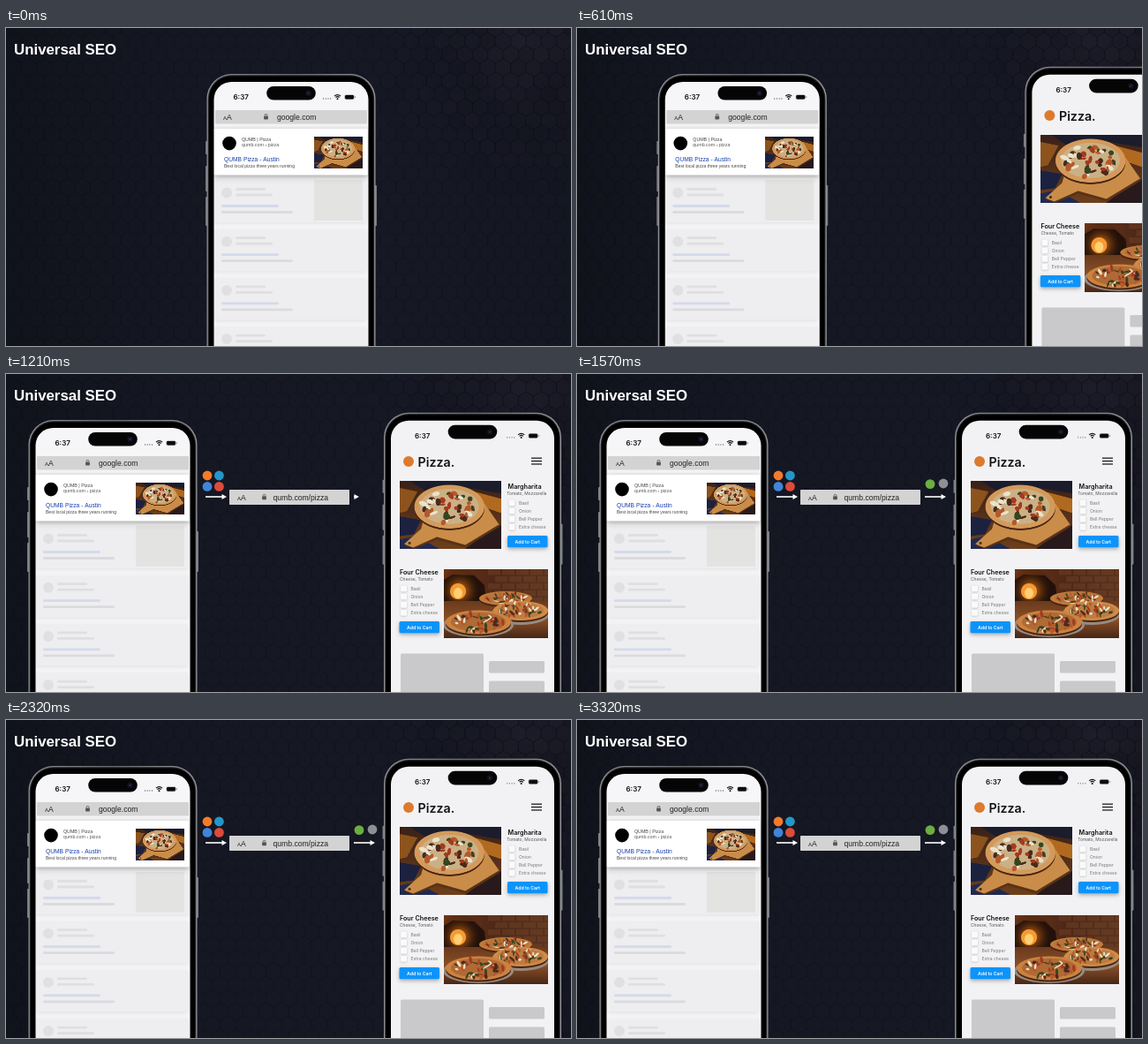
Write an HTML page with a canvas that moves like this. It is 640x360 px and loops after 3.49 s.

```html
<!DOCTYPE html>
<html lang="en">
<head>
<meta charset="utf-8">
<title>Universal SEO</title>
<style>
  html, body { margin: 0; width: 100%; height: 100%; overflow: hidden; background: #141621; }
  canvas { display: block; width: 640px; height: 360px; }
</style>
</head>
<body>
<canvas id="stage"></canvas>
<script>
const W = 640, H = 360, LOOP = 3490;
const SANS = '"Liberation Sans", Arial, sans-serif';
const UI = 'Inter, Roboto, sans-serif';
const dpr = window.devicePixelRatio || 1;
const canvas = document.getElementById('stage');
canvas.width = W * dpr;
canvas.height = H * dpr;
let ctx = canvas.getContext('2d');

const clamp = v => Math.min(1, Math.max(0, v));
const span = (t, a, b) => clamp((t - a) / (b - a));
const easeCubic = u => u < 0.5 ? 4 * u ** 3 : 1 - 4 * (1 - u) ** 3;
const easeQuad = u => u < 0.5 ? 2 * u * u : 1 - 2 * (1 - u) ** 2;

function seeded(seed) {
  return () => (seed = (seed * 16807) % 2147483647) / 2147483647;
}

function rect(x, y, w, h, color, r = 0) {
  ctx.fillStyle = color;
  ctx.beginPath();
  ctx.roundRect(x, y, w, h, r);
  ctx.fill();
}

function ellipse(x, y, rx, ry, color, turn = 0) {
  ctx.fillStyle = color;
  ctx.beginPath();
  ctx.ellipse(x, y, rx, ry, turn, 0, 7);
  ctx.fill();
}

const circle = (x, y, r, color) => ellipse(x, y, r, r, color);

function poly(color, ...pts) {
  ctx.fillStyle = color;
  ctx.beginPath();
  for (let i = 0; i < pts.length; i += 2) ctx.lineTo(pts[i], pts[i + 1]);
  ctx.fill();
}

function text(str, x, y, size, color, weight = 400, family = SANS, align = 'left') {
  ctx.font = `${weight} ${size}px ${family}`;
  ctx.textAlign = align;
  ctx.fillStyle = color;
  ctx.fillText(str, x, y);
}

function shadowed(color, blur, dy, draw) {
  ctx.save();
  ctx.shadowColor = color;
  ctx.shadowBlur = blur * dpr;
  ctx.shadowOffsetY = dy * dpr;
  draw();
  ctx.restore();
}

function fadeFrom(x0, y0, x1, y1, ...colors) {
  const g = ctx.createLinearGradient(x0, y0, x1, y1);
  colors.forEach((c, i) => g.addColorStop(i / (colors.length - 1), c));
  return g;
}

function glow(x, y, r, color) {
  const g = ctx.createRadialGradient(x, y, 0, x, y, r);
  g.addColorStop(0, color);
  g.addColorStop(1, 'transparent');
  ctx.fillStyle = g;
  ctx.fillRect(x - r, y - r, 2 * r, 2 * r);
}

// Draws once into an offscreen canvas and returns it.
function prerender(w, h, scale, draw) {
  const layer = document.createElement('canvas');
  layer.width = Math.round(w * scale);
  layer.height = Math.round(h * scale);
  const main = ctx;
  ctx = layer.getContext('2d');
  ctx.scale(scale, scale);
  draw();
  ctx = main;
  return layer;
}

function drawBackdrop() {
  ctx.fillStyle = fadeFrom(0, 0, W, 0, '#11131c', '#151723', '#161824', '#141621');
  ctx.fillRect(0, 0, W, H);
  glow(590, 20, 140, 'rgba(46,40,54,.25)');
  const R = 10, dx = R * Math.sqrt(3);
  const rand = seeded(41);
  for (let row = 0; row * R * 1.5 < H + R; row++) {
    for (let col = 0; col * dx < W + dx; col++) {
      const x = col * dx + (row % 2) * dx / 2, y = row * R * 1.5;
      const corner = clamp(1 - Math.hypot(x - 600, y) / 200);
      ctx.beginPath();
      for (let k = 0; k < 6; k++) {
        const a = Math.PI / 6 + k * Math.PI / 3;
        ctx.lineTo(x + R * Math.cos(a), y + R * Math.sin(a));
      }
      ctx.closePath();
      ctx.fillStyle = `rgba(80,66,85,${corner * rand() * 0.1})`;
      ctx.fill();
      ctx.lineWidth = 0.8;
      ctx.strokeStyle = `rgba(4,6,14,${0.08 + corner * 0.12})`;
      ctx.stroke();
    }
  }
}

function pizza(x, y, rx, ry, seed, crust, cheese) {
  ellipse(x, y + 2, rx, ry, '#4a2512');
  ellipse(x, y, rx, ry, crust);
  ellipse(x, y - 0.3, rx * 0.84, ry * 0.81, cheese);
  const rand = seeded(seed);
  const tones = ['#a33a20', '#37451f', '#ece2cb', '#b5582c', '#4a2a1c'];
  for (let i = 0; i < 45; i++) {
    const a = rand() * 6.28, d = Math.sqrt(rand()) * 0.76;
    ellipse(x + rx * d * Math.cos(a), y + ry * d * Math.sin(a),
      rx * (0.05 + rand() * 0.08), ry * (0.05 + rand() * 0.09), tones[i % 5], rand() * 3);
  }
}

function drawBoardPhoto() {
  rect(0, 0, 114, 76, fadeFrom(0, 0, 0, 76, '#3a2118', '#55301a', '#6e401b'));
  poly('#1b1c2c', 12, 0, 114, 0, 114, 14, 78, 8, 30, 12);
  poly('#8d531d', 0, 8, 20, 12, 8, 34, 0, 36);
  poly('#1c2140', 0, 40, 24, 44, 16, 60, 0, 62);
  poly('#202a52', 0, 66, 18, 62, 44, 76, 0, 76);
  poly('#b0691f', 84, 12, 114, 20, 114, 36, 96, 30);
  poly('#281a1c', 88, 66, 114, 50, 114, 76, 74, 76);
  poly('#5a3216', 6, 73, 24, 56, 30, 34, 96, 28, 112, 52, 74, 75, 42, 66, 17, 76);
  poly('#c98d49', 5, 71, 24, 54, 30, 32, 96, 26, 112, 49, 74, 72, 42, 63, 15, 75);
  circle(11, 70, 1.5, '#4a2c18');
  pizza(56, 29, 39.5, 24.5, 77, '#d39a5b', '#cbb085');
}

function drawOvenPhoto() {
  rect(0, 0, 118, 78, fadeFrom(0, 0, 118, 0, '#6e3518', '#4d2818', '#57331f'));
  for (let y = 0; y < 34; y += 8)
    for (let x = 50 + (y % 16); x < 118; x += 16) rect(x, y, 14, 6.5, 'rgba(125,72,40,.38)');
  poly('#24110c', 0, 36, 0, 12, 10, 6, 34, 7, 46, 18, 48, 36);
  glow(18, 24, 26, 'rgba(255,130,24,1)');
  ellipse(16, 25, 9, 9, '#f59a35');
  ellipse(16, 27, 5, 6, '#ffd071');
  rect(0, 36, 118, 42, fadeFrom(0, 36, 0, 78, '#6a3a1e', '#8a4f27', '#472717'));
  pizza(70, 33, 30, 8, 19, '#c27a3b', '#b8743a');
  ellipse(87, 50, 33, 13, '#968b80');
  pizza(87, 47, 31, 11, 23, '#d08b48', '#bd7c40');
  ellipse(39, 63, 40, 14, '#968b80');
  pizza(39, 60, 37, 13.5, 91, '#cc8240', '#b06a35');
}

const backdrop = prerender(W, H, dpr, drawBackdrop);
const boardPhoto = prerender(114, 76, 2 * dpr, drawBoardPhoto);
const ovenPhoto = prerender(118, 78, 2 * dpr, drawOvenPhoto);

function lock(x, y) {
  rect(x - 2.4, y - 0.8, 4.8, 4, '#555', 0.7);
  ctx.strokeStyle = '#555';
  ctx.lineWidth = 0.9;
  ctx.beginPath();
  ctx.arc(x, y - 1.2, 1.5, Math.PI, 0);
  ctx.stroke();
}

function addressBar(x, y, w, h, host) {
  rect(x, y, w, h, '#d3d3d4', 0.8);
  const base = y + h / 2 + 3, wide = w > 150;
  text('A', x + 9, base, 6, '#222');
  text('A', x + 13, base, 8.6, '#222');
  lock(x + (wide ? 57.5 : 39.5), y + h / 2 - 0.5);
  text(host, x + (wide ? 70 : 49.5), base, 8.6, '#222');
}

// Shell and status bar; x, y is the outer top left corner.
function phone(x, y, w, fill, statusGap) {
  for (const [top, len] of [[76, 15], [104, 29], [139, 33]])
    rect(x - 1.5, y + top, 2.4, len, '#77797e', 0.8);
  rect(x + w - 0.9, y + 126, 2.4, 46, '#77797e', 0.8);
  rect(x, y, w, 400, fadeFrom(x, 0, x + w, 0, '#8f9195', '#68696d', '#96989c'), 28);
  rect(x + 1.3, y + 1.3, w - 2.6, 400, '#232427', 27);
  rect(x + 2.4, y + 2.4, w - 4.8, 400, '#000', 26);
  rect(x + 8, y + 9, w - 16, 400, fill, 20);

  const mid = x + w / 2, line = y + 26;
  text('6:37', mid - 65.5, y + 29.4, 8, '#111', 600, UI);
  rect(mid - 27.8, y + 14, 55.6, 15.6, '#050506', 7.8);
  circle(mid + 19.5, y + 21.8, 3.2, '#10131f');
  circle(mid + 19.5, y + 21.8, 1.2, '#242c4c');
  const left = mid + statusGap;
  for (let i = 0; i < 4; i++) circle(left + i * 2.7, line + 2, 0.65, '#666');
  const wx = left + 16, wy = line + 2.6;
  ctx.strokeStyle = '#111';
  ctx.lineWidth = 1.2;
  for (const r of [2.9, 5]) {
    ctx.beginPath();
    ctx.arc(wx, wy, r, -2.36, -0.78);
    ctx.stroke();
  }
  circle(wx, wy - 0.4, 1, '#111');
  rect(left + 24, line - 2.6, 11, 5.6, '#999', 1.8);
  rect(left + 24.6, line - 2, 9.8, 4.4, '#0c0c0c', 1.3);
  rect(left + 35.6, line - 0.8, 0.9, 2, '#888', 0.4);
}

function searchPhone() {
  phone(227.5, 52, 191, '#f6f6f8', 36.5);
  addressBar(237, 93, 172, 15.4, 'google.com');

  for (let c = 186.5, first = true; c < 380; c += 55.2, first = false) {
    shadowed('rgba(0,0,0,.08)', 4, 1.5, () => rect(236, c - 14, 172, 47.5, '#eeedf0', 1));
    circle(250, c, 6, '#e0e0e2');
    rect(260, c - 5.4, 34, 2.8, '#dfdfe1', 1.4);
    rect(260, c + 1.1, 42, 2.8, '#dfdfe1', 1.4);
    rect(244, c + 13.6, 65, 2.8, '#d3daea', 1.4);
    rect(244, c + 20.6, 81, 2.8, '#dbdbdd', 1.4);
    if (first) rect(349, 172, 55, 46, '#e3e4e2', 1);
  }

  shadowed('rgba(0,0,0,.35)', 6, 2, () => rect(235.8, 114, 174, 52.5, '#fff', 1));
  circle(253, 130.6, 7.8, '#000');
  text('QUMB | Pizza', 267, 128, 5.3, '#444');
  text('qumb.com › pizza', 267, 134, 5.35, '#555');
  text('QUMB Pizza - Austin', 247, 151.4, 6.7, '#1740ae');
  text('Best local pizza three years running', 247, 157.6, 5.05, '#444');
  ctx.drawImage(boardPhoto, 349, 122.6, 55, 36.6);
}

function order(x, y, name, toppings, indent, box) {
  text(name, x, y, 7.2, '#111', 600, UI);
  text(toppings, x - indent, y + 6.5, 4.9, '#555', 400, UI);
  ['Basil', 'Onion', 'Bell Pepper', 'Extra cheese'].forEach((label, i) => {
    const cy = y + 16 + i * 9.1;
    shadowed('rgba(0,0,0,.25)', 2, 0.5, () => rect(box, cy - 3.5, 7, 7, '#fafafa', 1));
    text(label, box + 11.4, cy + 1.8, 5, '#777', 400, UI);
  });
  shadowed('rgba(0,0,0,.3)', 4, 2, () => rect(box - 1.5, y + 53, 45.5, 13.2, '#0c94fb', 1.5));
  text('Add to Cart', box + 21.2, y + 61.5, 5.2, '#fff', 600, UI, 'center');
}

function shopPhone() {
  phone(428, 43.8, 201, '#f2f2f4', 39.2);
  circle(456, 99, 6, '#dd7a2d');
  text('Pizza.', 466.6, 104.6, 14.2, '#111', 600, UI);
  for (let i = 0; i < 3; i++) rect(595, 94.6 + i * 3.4, 12, 1.2, '#111');
  ctx.drawImage(boardPhoto, 446, 121, 114.5, 76.5);
  order(568.6, 130, 'Margharita', 'Tomato, Mozzarella', 1.4, 569.5);
  order(446, 227, 'Four Cheese', 'Cheese, Tomato', 0, 447);
  ctx.drawImage(ovenPhoto, 496, 221, 118, 78);
  rect(447, 316.5, 94, 50, '#c9c9cb', 1.5);
  rect(547, 325, 63, 13.5, '#c9c9cb', 1.5);
  rect(547, 347.5, 63, 13.5, '#c9c9cb', 1.5);
}

function arrow(x, y, grown) {
  if (grown <= 0) return;
  const tip = x + 5.5 + 18.5 * grown;
  rect(x, y - 0.8, tip - 4 - x, 1.6, '#fff');
  poly('#fff', tip - 5.5, y - 3, tip, y, tip - 5.5, y + 3);
}

function faded(alpha, draw) {
  if (alpha <= 0) return;
  ctx.save();
  ctx.globalAlpha = alpha;
  draw();
  ctx.restore();
}

function shifted(dx, draw) {
  ctx.save();
  ctx.translate(dx, 0);
  draw();
  ctx.restore();
}

function render(t) {
  ctx.setTransform(dpr, 0, 0, dpr, 0, 0);
  ctx.drawImage(backdrop, 0, 0, W, H);
  text('Universal SEO', 9, 30, 16.85, '#fff', 700);

  const slide = easeCubic(span(t, 296, 853));
  shifted(-202 * slide, searchPhone);
  if (slide > 0) shifted(242 * (1 - slide), shopPhone);

  arrow(226, 139, easeQuad(span(t, 855, 1060)));
  faded(span(t, 1000, 1100), () => {
    circle(228, 115, 5.4, '#f57a2a');
    circle(241.4, 115, 5.4, '#2596c9');
    circle(228, 127.4, 5.4, '#3f86d8');
    circle(241.4, 127.4, 5.4, '#dd4b3b');
  });
  faded(span(t, 1080, 1200), () => addressBar(253, 131, 136, 17, 'qumb.com/pizza'));
  arrow(394, 139, easeQuad(span(t, 1190, 1390)));
  faded(span(t, 1330, 1430), () => {
    circle(400, 124.6, 5.4, '#6cae42');
    circle(415, 124, 5.4, '#8d8f94');
  });
}

function tick() {
  render(performance.now() % LOOP);
  requestAnimationFrame(tick);
}
tick();
</script>
</body>
</html>
```
